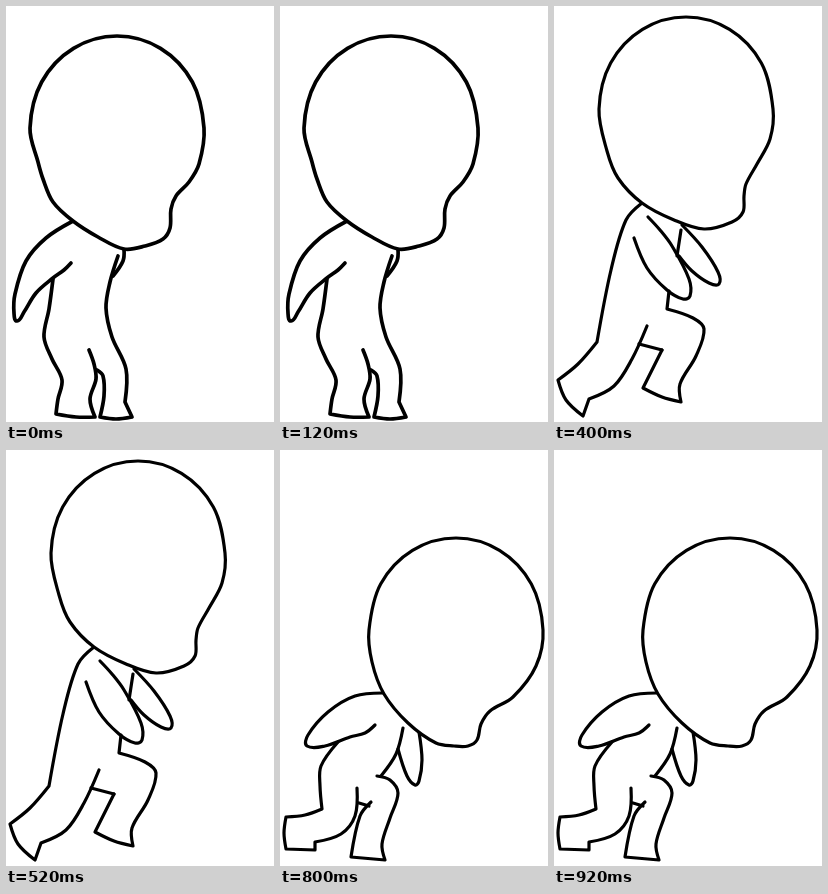
Write an HTML page with a canvas that moves like this. It is 268 px wide and 416 px high and loops after 1 s.

```html
<!DOCTYPE html>
<html lang="en">
<head>
<meta charset="utf-8">
<title>Run cycle</title>
<style>
  html, body { margin: 0; width: 100%; height: 100%; overflow: hidden; background: #fff; }
  canvas { display: block; width: 100vw; height: 100vh; }
</style>
</head>
<body>
<canvas id="stage" width="268" height="416"></canvas>
<script>
const HOLD = 200;
const ctx = document.getElementById('stage').getContext('2d');
ctx.lineCap = ctx.lineJoin = 'round';

const pairs = flat => flat.flatMap((x, i) => i % 2 ? [] : [[x, flat[i + 1]]]);

// Handle a third of the way from p to q, along the tangent between p's neighbours.
function handle(p, q, from, to) {
  if (!from || !to) return p;
  const [dx, dy] = [to[0] - from[0], to[1] - from[1]];
  const k = Math.hypot(q[0] - p[0], q[1] - p[1]) / 3 / Math.hypot(dx, dy);
  return [p[0] + dx * k, p[1] + dy * k];
}

// Smooth curve through all points.
function spline(pts, closed) {
  const n = pts.length;
  const at = i => closed ? pts[(i + n) % n] : pts[i];
  for (let i = 0; i < (closed ? n : n - 1); i++) {
    const [o, p, q, r] = [at(i - 1), at(i), at(i + 1), at(i + 2)];
    ctx.bezierCurveTo(...handle(p, q, o, q), ...handle(q, p, r, p), ...q);
  }
}

// Each run continues from the end of the previous one with a sharp corner.
function line(...runs) {
  let end;
  ctx.beginPath();
  for (const run of runs) {
    const pts = pairs(run);
    if (end) pts.unshift(end);
    else ctx.moveTo(...pts[0]);
    spline(pts);
    end = pts[pts.length - 1];
  }
  ctx.stroke();
}

// Half an ellipse for the skull, then the jaw from right to left.
function head(x, y, ...jaw) {
  const pts = pairs(jaw);
  for (let i = 6; i >= 0; i--) {
    const a = Math.PI * (1 + i / 6);
    pts.unshift([x + 87 * Math.cos(a), y + 92 * Math.sin(a)]);
  }
  pts.push(...pts.splice(0, 7).reverse().reverse());
  ctx.beginPath();
  ctx.moveTo(...pts[0]);
  spline(pts, true);
  ctx.fillStyle = '#fff';
  ctx.fill();
  ctx.stroke();
}

function stand() {
  ctx.lineWidth = 3.7;
  line([67, 215, 40, 232, 20, 255, 9, 288, 8, 307, 11, 315, 18, 306, 30, 287, 47, 272, 58, 264, 65, 257]);
  line([47, 273, 43, 303, 38, 331, 46, 353, 56, 374, 52, 393, 50, 408], [70, 411, 89, 411], [84, 393, 90, 373, 88, 358, 83, 344]);
  line([118, 243, 117, 255, 107, 270]);
  line([112, 250, 104, 276, 100, 302, 106, 331, 120, 363, 119, 396], [126, 411], [110, 413, 94, 411], [98, 390, 97, 370, 91, 364]);
  head(111, 122, 193, 158, 183, 176, 170, 190, 165, 203, 164, 222, 157, 233, 139, 240, 118, 243, 92, 231, 67, 215, 47, 196, 37, 173, 32, 156);
}

function leap() {
  ctx.lineWidth = 3.2;
  line([90, 213, 66, 229, 48, 260, 34, 288, 31, 299, 36, 302, 50, 294, 66, 281, 79, 265, 84, 248]);
  line([66, 281, 60, 316, 47, 348, 31, 374, 31, 390, 39, 410, 46, 408, 51, 392, 74, 364, 94, 336, 104, 319]);
  line([131, 226, 130, 255, 122, 283, 118, 306], [132, 307, 141, 315, 135, 335, 128, 353, 130, 376], [117, 374, 104, 362, 107, 345, 115, 324]);
  line([96, 332, 109, 335]);
  line([131, 212, 158, 209, 180, 211, 186, 217, 174, 229, 134, 245]);
  head(94, 113, 180, 135, 179, 157, 184, 170, 184, 181, 166, 197, 127, 214, 90, 213, 64, 207, 40, 185, 18, 154);
}

function stride() {
  ctx.lineWidth = 3.2;
  line([88, 197, 72, 214, 57, 264, 43, 336], [24, 358, 4, 374], [12, 394, 29, 410], [35, 393], [60, 380, 78, 353, 93, 320]);
  line([85, 338, 108, 344]);
  line([115, 285, 113, 303], [139, 312, 150, 323, 142, 350, 126, 378, 127, 396], [108, 391, 89, 382], [108, 344]);
  line([80, 232, 93, 262, 113, 284, 129, 293, 136, 290, 135, 273, 118, 240, 106, 224, 94, 211]);
  line([128, 219, 148, 241, 164, 266, 165, 278, 155, 277, 138, 265, 125, 250]);
  line([127, 224, 123, 250]);
  head(132, 103, 216, 133, 203, 158, 192, 178, 190, 190, 189, 206, 178, 216, 150, 223, 120, 214, 88, 197, 64, 172, 53, 145);
}

function kick() {
  ctx.lineWidth = 3.2;
  line([72, 208, 41, 233, 25, 256, 22, 270, 36, 266, 61, 247, 75, 233]);
  line([61, 247, 60, 275, 57, 300, 45, 318], [33, 307], [16, 311, 5, 327, 6, 336], [18, 338], [41, 354], [66, 341, 88, 327]);
  line([120, 226, 122, 265, 116, 306, 109, 340, 106, 364, 99, 388, 98, 412], [82, 404, 72, 388, 79, 362, 75, 335]);
  line([128, 212, 140, 236, 147, 263, 144, 276, 133, 265, 123, 243]);
  head(105, 116, 190, 138, 190, 152, 193, 163, 186, 175, 162, 195, 128, 212, 100, 213, 72, 208, 48, 193, 33, 171, 23, 143);
}

function crouch() {
  ctx.lineWidth = 3.2;
  line([104, 243, 75, 246, 48, 262, 28, 285, 27, 296, 45, 296, 70, 287, 85, 283, 95, 275]);
  line([58, 292, 41, 316, 40, 336, 42, 359], [25, 365, 6, 367], [4, 383, 6, 399], [35, 400], [35, 392], [61, 384, 75, 366, 77, 338]);
  line([79, 353, 89, 356]);
  line([97, 326, 110, 330, 118, 343, 110, 368, 102, 394, 105, 410], [71, 407], [80, 366, 91, 352]);
  line([123, 278, 116, 304, 101, 326]);
  line([139, 282, 142, 310, 139, 331, 135, 335, 127, 326, 118, 299]);
  head(176, 180, 256, 216, 233, 247, 210, 261, 201, 274, 197, 290, 188, 296, 174, 296, 156, 293, 128, 273, 104, 244, 92, 212);
}

const poses = [stand, leap, stride, kick, crouch];

function tick() {
  ctx.clearRect(0, 0, 268, 416);
  poses[Math.floor(performance.now() / HOLD) % poses.length]();
  requestAnimationFrame(tick);
}
tick();
</script>
</body>
</html>
```
